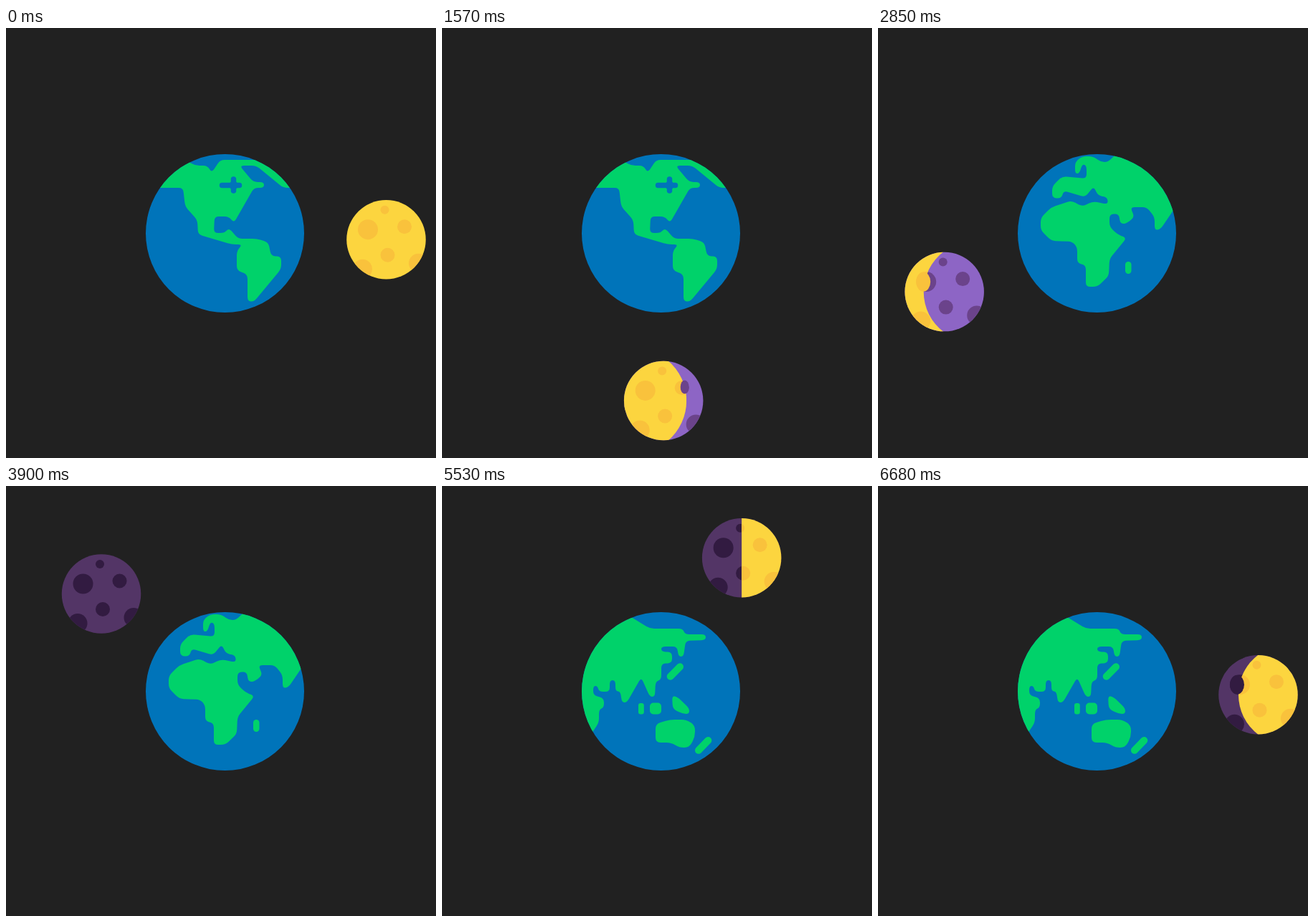
An HTML page that plays this animation: 600x600 px, repeating every 6700 ms.

```html
<!DOCTYPE html>
<html lang="en">
<head>
<meta charset="utf-8">
<title>Earth and Moon</title>
<style>
  html, body { margin: 0; width: 100%; height: 100%; overflow: hidden; background: #212121; }
  body > svg { display: block; width: 100%; height: 100%; animation: orbit 6.7s linear infinite; }

  /* Integers round, so subtracting almost a half turns them into a floor. */
  @property --deg { syntax: "<number>"; inherits: true; initial-value: 0; }
  @property --phase { syntax: "<integer>"; inherits: false; initial-value: 0; }
  @property --view { syntax: "<integer>"; inherits: false; initial-value: 0; }

  @keyframes orbit {
    0% { --deg: 0; }
    23.43% { --deg: 89; }
    42.54% { --deg: 161; }
    58.21% { --deg: 219.9; }
    71.64% { --deg: 269; }
    82.54% { --deg: 300; }
    100% { --deg: 360; }
  }

  #moon {
    transform: translate(305.5px, 295px) rotate(calc(var(--deg) * 1deg))
      translate(225px) rotate(calc(var(--deg) * -1deg));
  }
  #phases {
    --phase: calc(var(--deg) / 45 - 0.499);
    transform: translateX(calc(var(--phase) * -200px));
  }
  #views {
    --view: calc(var(--deg) / 120 - 0.499);
    transform: translateX(calc(var(--view) * -300px));
  }

  .sea { fill: #0074ba; }
  .land { fill: #00d26a; }
  .bar { fill: none; stroke: #00d26a; stroke-width: 10; stroke-linecap: round; }
  .lake { fill: #0074ba; stroke: #0074ba; stroke-width: 7.5; stroke-linecap: round; }
</style>
</head>
<body>
<svg viewBox="0 0 600 600">
  <defs>
    <clipPath id="globe"><circle cx="305.5" cy="286.5" r="110.5"/></clipPath>
    <clipPath id="disc"><circle r="55.25"/></clipPath>
    <g id="craters" clip-path="url(#disc)">
      <circle cx="-25.5" cy="-14" r="14"/>
      <circle cx="25.5" cy="-18" r="10"/>
      <circle cx="-2" cy="-41.5" r="6"/>
      <circle cx="2" cy="21.5" r="10"/>
      <circle cx="-33" cy="41" r="13.5"/>
      <circle cx="45" cy="33" r="13.5"/>
    </g>
  </defs>

  <circle class="sea" cx="305.5" cy="286.5" r="110.5"/>
  <g clip-path="url(#globe)"><g id="views"></g></g>

  <g id="moon">
    <svg x="-60" y="-60" width="120" height="120" viewBox="-60 -60 120 120" overflow="hidden">
      <g id="phases"></g>
    </svg>
  </g>
</svg>

<script>
  // Closed outline through a few key points, with softened corners.
  function land(text, radius = 6) {
    const pts = text.trim().split(/\s+/).map(p => p.split(",").map(Number));
    const toward = (p, q) => {
      const k = Math.min(radius / Math.hypot(q[0] - p[0], q[1] - p[1]), 0.5);
      return p.map((v, i) => v + (q[i] - v) * k);
    };
    const corners = pts.map((p, i) => {
      const prev = pts.at(i - 1), next = pts[(i + 1) % pts.length];
      return `${toward(p, prev)}Q${p} ${toward(p, next)}`;
    });
    return `<path class="land" d="M${corners.join("L")}Z"/>`;
  }

  const block = (x, y, w, h, r) =>
    `<rect class="land" x="${x}" y="${y}" width="${w}" height="${h}" rx="${r}"/>`;
  const bar = d => `<path class="bar" d="${d}"/>`;

  const americas = land(`
    190,223 247,223 250,249 267,268 268,288 315,302 330,302 322,311 322,338 337,344
    337,381 346,382 384,336 384,319 370,318 366,299 350,294 324,294 311,279 305,286
    290,286 291,263 311,263 318,272 346,223 360,223 360,215 345,215 326,192 349,192
    387,223 430,223 430,184 299,184 287,202 281,192 264,192 240,178 190,178`)
    + `<path class="lake" d="M301.5 219.5H325.5M317.5 211V227"/>
       <path class="sea" d="M309 219.5L317.5 211L326 219.5L317.5 228Z"/>`;

  const africa = land(`
    338,170 321,187 311,187 300,179 285,179 275,187 275,203 281,203 285,190 291,192
    291,210 257,207 243,221 243,237 256,238 259,227 289,236 301,221 307,234 320,236
    321,246 300,242 285,249 270,241 242,250 227,265 227,282 242,297 271,298 278,306
    278,328 290,331 290,361 306,361 322,346 323,322 347,293 334,288 323,277 323,260
    336,259 338,273 346,273 358,264 352,250 375,250 386,264 386,282 394,281 430,228
    430,170`)
    + block(345, 326, 8.5, 17, 4.2);

  const asia = land(`
    243,170 290,199 336,199 339,207 368,207 368,215 340,216 337,238 330,238 328,224
    306,224 306,231 321,232 321,247 306,248 306,270 298,273 297,294 290,294 278,267
    258,302 251,302 249,287 242,286 242,271 234,271 234,287 219,287 217,279 211,279
    211,292 226,296 226,309 219,312 219,330 200,358 180,358 180,170`)
    + land("298,332 318,326 341,326 353,334 353,350 345,365 331,365 320,358 298,358", 7)
    + land("321,293 328,294 345,310 345,318 336,318 322,311")
    + block(274, 303, 7.8, 15.5, 3.2)
    + block(290, 302.5, 16, 16, 5)
    + bar("M318.7 265.8L332 252.3") + bar("M358 368.8L371.3 355");

  const strip = (id, gap, cells) => {
    document.getElementById(id).innerHTML = cells
      .map((cell, i) => `<g transform="translate(${i * gap})">${cell}</g>`).join("");
  };
  strip("views", 300, [americas, africa, asia]);

  // Tones are [surface, crater].
  const bright = ["#fcd53f", "#f9c23c"];
  const violet = ["#8d65c5", "#6b438b"];
  const night = ["#533566", "#321b41"];

  const disc = ([surface, crater]) =>
    `<circle r="55.25" fill="${surface}"/><use href="#craters" fill="${crater}"/>`;

  // Lit side (-1 left, 1 right) of a circular shadow line from tip to tip through mid.
  function litArea(side, tip, mid) {
    const h = 56, s = Math.abs(mid - tip);
    const edge = s ? `A${[(h * h + s * s) / (2 * s), 0]} 0 0 ${+(mid > tip)} ${tip} ${h}` : `V${h}`;
    // the radius is shared by both axes
    const path = edge.replace(",0 0 0", ` ${(h * h + s * s) / (2 * s)} 0 0`);
    return `M${tip} ${-h}${path}H${side * 60}V${-h}Z`;
  }

  // A crater on the shadow line bulges across it.
  const lens = (mid, tone) => mid > 0
    ? `<ellipse cx="29.5" cy="-19" rx="6" ry="9.5" fill="${tone[1]}"/>`
    : `<ellipse cx="-29.5" cy="-14" rx="10" ry="13.5" fill="${tone[1]}"/>`;

  let count = 0;
  function partMoon(shade, side, tip = 0, mid = 0) {
    const id = `lit${count++}`;
    const gibbous = side * mid < 0;
    return `${disc(shade)}
      <clipPath id="${id}"><path d="${litArea(side, tip, mid)}"/></clipPath>
      <g clip-path="url(#${id})">${disc(bright)}</g>
      ${mid ? lens(mid, gibbous ? shade : bright) : ""}`;
  }

  strip("phases", 200, [
    disc(bright),
    partMoon(violet, -1, 6, 32),
    partMoon(violet, -1),
    partMoon(violet, -1, -1, -29),
    disc(night),
    partMoon(night, 1, 3.5, 29.5),
    partMoon(night, 1),
    partMoon(night, 1, 0.5, -27.5)
  ]);
</script>
</body>
</html>
```
